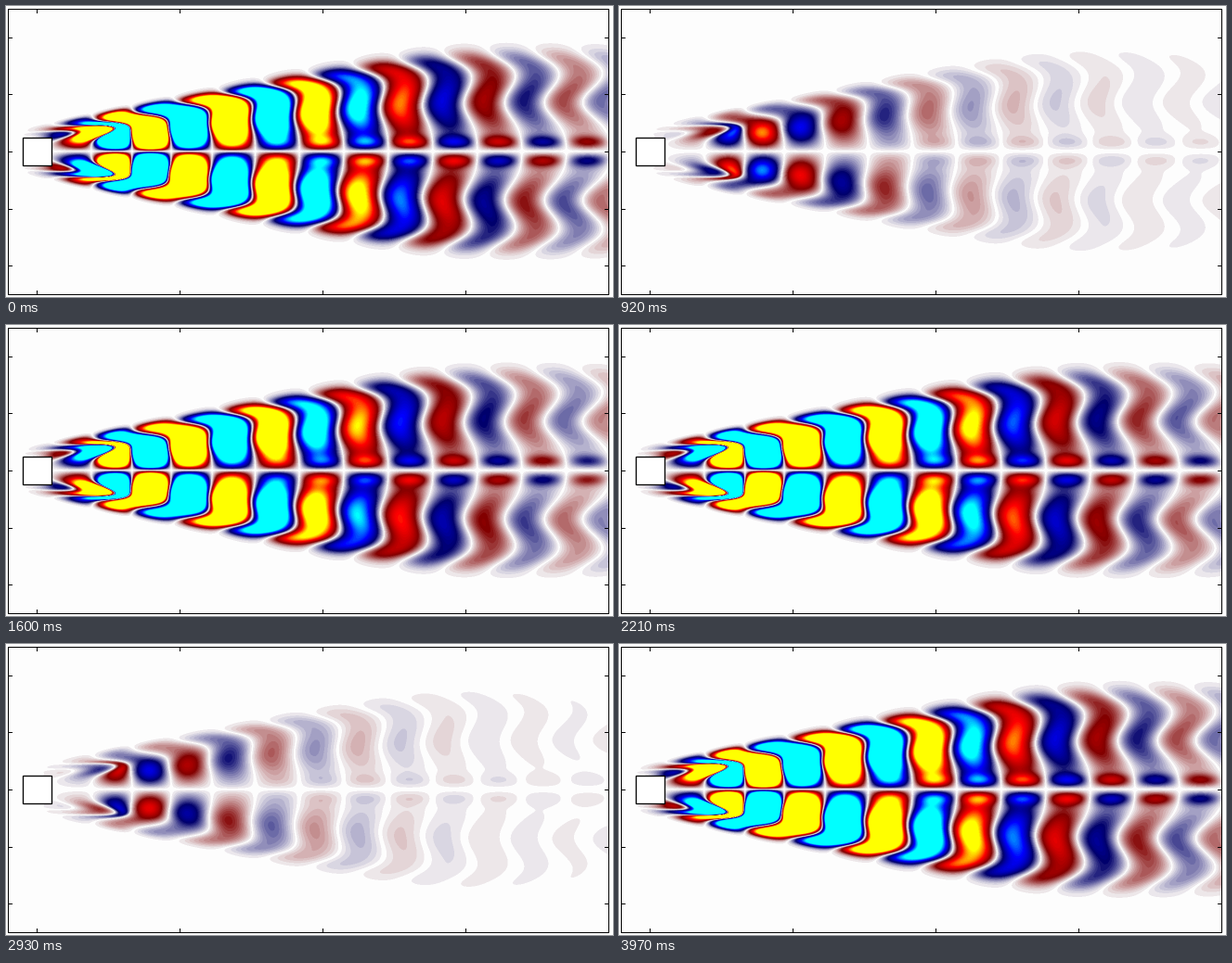
Recreate the animation shown at these times as a matplotlib script. Size 654 by 314 pixels, loop 4010 ms.

```python
import numpy as np
import matplotlib.pyplot as plt
from matplotlib.animation import FuncAnimation
from matplotlib.patches import Rectangle

W, H, DPI = 654, 314, 100
SS = 2               # supersampling of the field
TICK, LOOP = 10, 4010
STEPS = 99           # phase steps per oscillation
LEVELS = 42          # contour bands on each side of zero
PX = 72 / DPI        # one pixel in points
LEFT, TOP, RIGHT, BOTTOM = 2.5, 3.5, 649.5, 311.5
AXIS = 156.8         # height of the wake's centre line

x = (np.arange(W * SS) + 0.5) / SS
y = (np.arange(H * SS) + 0.5) / SS


def bump(v, mid, width):
    return np.exp(-((v - mid) / width) ** 2)


def rise(v, mid, width):
    """Smooth step from 0 to 1."""
    return 0.5 * (1 + np.tanh((v - mid) / (2 * width)))


def crest(p, eta):
    """Position along x of phase p (in half waves) at relative height eta."""
    axis = 157 + 48 * p - 9 * np.tanh(p / 1.5)
    far = -2.2 * np.exp(p / 4) * bump(eta, 0.45, 0.2)
    near = 32 * rise(-p, 1, 1 / 6) * bump(eta, 0.57, 0.2)
    tail = -44 * rise(eta, 0.77 + 0.08 * np.tanh(p - 1), 0.06)
    return axis + far + near + tail


def wave_phase(eta, first=-4, last=12, step=0.5):
    """Invert crest() piecewise."""
    phase = np.full(eta.shape, float(first))
    left = crest(first, eta)
    for p in np.arange(first, last, step) + step:
        right = crest(p, eta)
        phase += step * np.clip((x - left) / (right - left), 0, 1)
        left = right
    return phase


def wake_mode():
    """Antisymmetric vortex-street mode behind the square."""
    d = (AXIS - y)[:, None]
    dist = np.abs(d)
    edge = 117 - 7 * np.logaddexp(0, (95 - 0.203 * x) / 7)
    eta = dist / edge

    growth = rise(x, 113, 16) * np.clip((x - 12) / 40, 0, 1)
    amp = growth * (8.5 * np.exp(-(x - 150) / 114) + 0.08)
    mid = 0.5 - 0.12 * bump(x, 150, 70)
    width = 0.26 - 0.07 * bump(x, 150, 90)
    body = bump(eta, mid, width * 2 ** 0.5) + 0.2 * bump(eta, 0.85, 0.14)
    body *= rise(-eta, -0.95, 0.035)

    core = 0.62 * np.exp((400 - x) / 350) * rise(x, 320, 30)
    shape = amp * body + core * bump(dist, 10, 7)
    return shape * np.cos(np.pi * wave_phase(eta)) * np.tanh(d / 3.5)


def palette():
    """Cyan, blue, navy, white, dark red, red, yellow."""
    stops = [-1, -2 / 3, -1 / 3, -1 / LEVELS, 0, 1 / LEVELS, 1 / 3, 2 / 3, 1]
    cols = np.array([(0, 255, 255), (0, 0, 255), (0, 0, 108), (236, 232, 236),
                     (253, 253, 253), (237, 231, 233), (130, 0, 0),
                     (255, 0, 0), (255, 255, 0)])
    v = np.linspace(-1, 1, 2 * LEVELS + 1)
    return np.stack([np.interp(v, stops, c) for c in cols.T], 1).astype(np.uint8)


field = wake_mode() * LEVELS
lut = palette()
cache = {}


def render(gain):
    band = np.clip(np.rint(field * gain), -LEVELS, LEVELS).astype(int) + LEVELS
    rgb = lut[band].astype(np.uint16)
    rgb = sum(rgb[i::SS, j::SS] for i in range(SS) for j in range(SS))
    img = (rgb // SS ** 2).astype(np.uint8)
    img[:int(TOP)] = img[int(BOTTOM):] = 255
    img[:, :int(LEFT)] = img[:, int(RIGHT):] = 255
    return img


def image_at(step):
    step = min(step, STEPS - step)     # the swing is symmetric in time
    if step not in cache:
        cache[step] = render(np.cos(2 * np.pi * step / STEPS))
    return cache[step]


fig = plt.figure(figsize=(W / DPI, H / DPI), dpi=DPI)
ax = fig.add_axes([0, 0, 1, 1])
ax.axis("off")
pic = ax.imshow(image_at(0), extent=(0, W, H, 0), interpolation="nearest",
                aspect="auto")
ax.set_xlim(0, W)
ax.set_ylim(H, 0)


def line(xs, ys):
    ax.plot(xs, ys, color="black", lw=PX, solid_capstyle="butt", snap=False)


def box(x0, y0, w, h, lw=1, **style):
    ax.add_patch(Rectangle((x0, y0), w, h, ec="black", lw=lw * PX,
                           snap=False, **style))


box(LEFT, TOP, RIGHT - LEFT, BOTTOM - TOP, fc="none")
box(18.5, 142.5, 31, 30, lw=1.3, fc="white", zorder=3)
for k in range(4):
    tx = 33.5 + 154 * k
    line([tx, tx], [TOP, TOP + 4.5])
    line([tx, tx], [BOTTOM - 4.5, BOTTOM])
for k in range(5):
    ty = round(33.8 + 61.6 * k) + 0.5
    line([LEFT, LEFT + 4.5], [ty, ty])
    line([RIGHT - 4.5, RIGHT], [ty, ty])


def update(n):
    t = n * TICK
    # the turning point is held one tick longer
    step = (t if t < 2000 else t - TICK) // 40
    pic.set_data(image_at(step))
    return [pic]


anim = FuncAnimation(fig, update, frames=LOOP // TICK, interval=TICK,
                     repeat=True, repeat_delay=0, blit=False)
plt.show()
```
